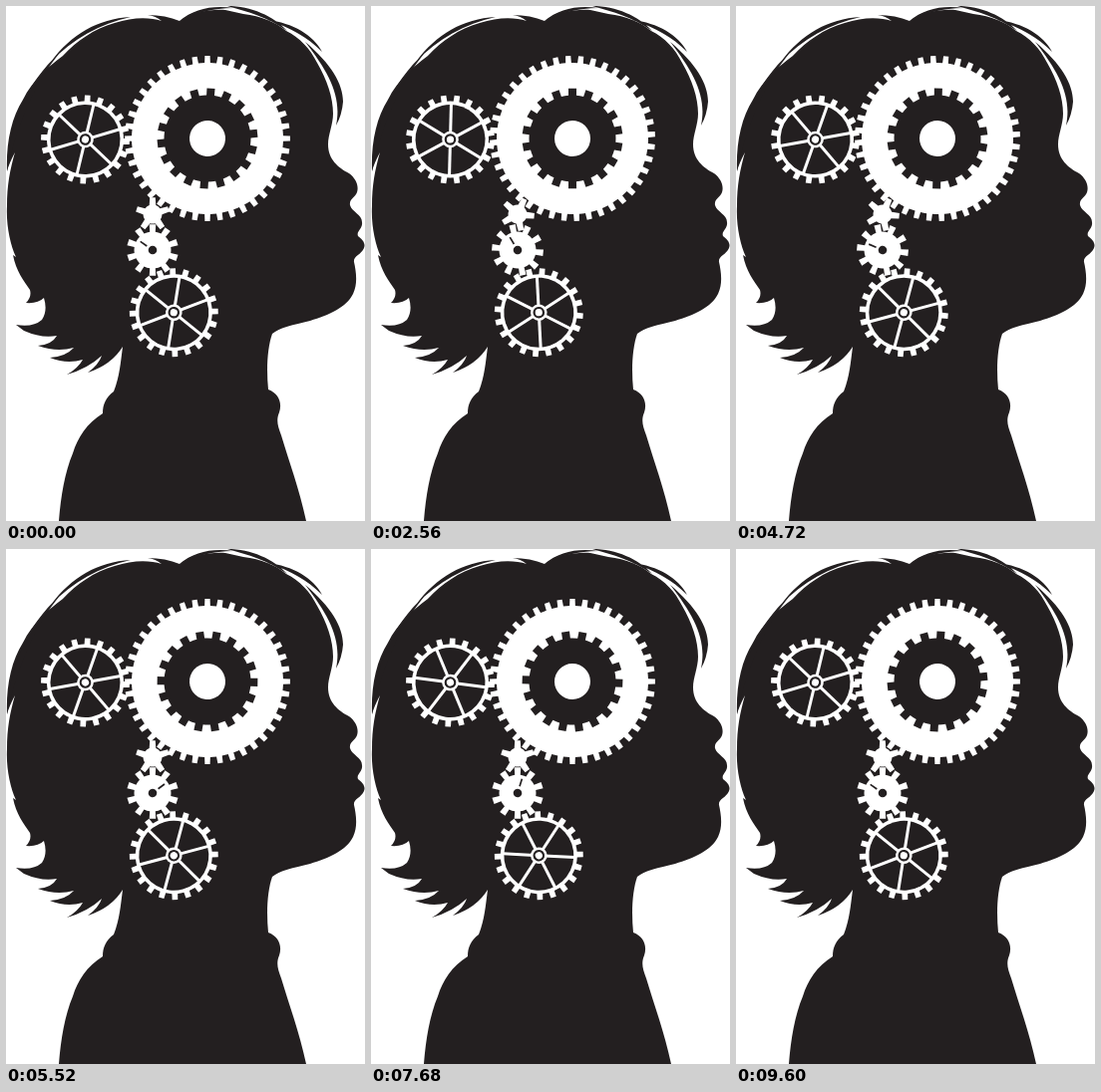
Write an HTML page with a canvas that moves like this. It is 360x517 px and loops after 9.68 s.

```html
<!DOCTYPE html>
<html lang="en">
<head>
<meta charset="utf-8">
<title>Turning gears</title>
<style>
html, body { margin: 0; width: 100%; height: 100%; overflow: hidden; background: #fff; }
canvas { display: block; width: 360px; height: 517px; }
</style>
</head>
<body>
<canvas id="stage" width="360" height="517"></canvas>
<script>
const ctx = document.getElementById('stage').getContext('2d');
const INK = '#231f20', PAPER = '#fff';
const STEP = 80, STEPS = 121;
const rad = deg => deg * Math.PI / 180;

const head = new Path2D(`M53 517 C55 492 59 468 67 449 C72 433 81 419 97 409
  C97 400 100 393 108 387 C114 372 115 357 117 342 Q106 360 82 368 Q93 360 96 351
  Q82 364 61 370 Q72 364 77 355 Q61 360 44 353 Q60 352 68 343 Q51 348 32 341
  Q46 340 51 331 Q36 334 18 326 L10 320 Q27 323 36 315 Q42 306 38 293
  Q32 299 20 298 Q26 292 24 285 C18 276 10 266 7 250 L10 252
  C4 239 0 219 1 201 C1 180 4 164 9 147 Q3 158 1 166 C0 138 5 113 17 94
  C27 74 41 62 57 50 C71 35 88 23 109 17 C127 11 144 11 156 15
  Q150 10 142 9 Q160 9 174 15 C186 6 205 3 220 4 L238 8
  C256 10 270 16 281 25 C295 32 305 43 312 57 C322 74 328 92 328 108
  C328 119 323 129 323 139 C323 154 333 162 344 168 C351 173 354 181 352 187
  C350 193 344 193 345 200 C347 207 357 209 357 217 C358 224 351 226 353 231
  C357 234 361 238 359 243 C356 250 348 251 349 257 C351 266 353 279 348 289
  C341 303 324 310 305 316 C288 320 274 323 267 329 C262 343 261 365 263 385
  C274 389 277 399 274 408 C271 415 272 421 276 431 C284 458 294 484 301 517 Z`);

// Loose strands of hair outside the main mass
const strands = new Path2D(`M1 166 C3 120 20 77 54 47 C30 76 12 115 1 166 Z
  M45 56 C66 28 92 13 125 11 C94 18 67 33 45 56 Z
  M174 15 C188 3 207 -1 228 2 C208 2 190 7 174 15 Z
  M222 0 C246 0 268 10 282 25 C262 11 243 6 222 0 Z
  M262 14 C288 17 308 29 317 46 C302 31 286 22 262 14 Z
  M300 36 C326 58 338 78 338 96 Q337 109 331 120 C337 91 324 67 300 36 Z`);

function disc(r, color) {
  ctx.fillStyle = color;
  ctx.beginPath();
  ctx.arc(0, 0, r, 0, 2 * Math.PI);
  ctx.fill();
}

function cog(teeth, base, tip, color, wide = 0.24, narrow = 0.2) {
  const pitch = 2 * Math.PI / teeth;
  ctx.fillStyle = color;
  ctx.beginPath();
  for (let i = 0; i < teeth; i++) {
    const mid = i * pitch - Math.PI / 2;
    for (const [r, offset] of [[base, -wide], [tip, -narrow], [tip, narrow], [base, wide]]) {
      const a = mid + offset * pitch;
      ctx.lineTo(r * Math.cos(a), r * Math.sin(a));
    }
    ctx.arc(0, 0, base, mid + wide * pitch, mid + (1 - wide) * pitch);
  }
  ctx.fill();
}

function spoke(from, to, width, color) {
  ctx.fillStyle = color;
  ctx.fillRect(-width / 2, -to, width, to - from);
}

function spokedWheel() {
  cog(20, 38.5, 44.5, PAPER);
  disc(35, INK);
  ctx.rotate(rad(-7.5));
  for (let i = 0; i < 6; i++) {
    spoke(5, 36, 3, PAPER);
    ctx.rotate(Math.PI / 3);
  }
  disc(8.3, PAPER);
  disc(5.8, INK);
  disc(3.6, PAPER);
}

function bigGear() {
  cog(40, 76, 83, PAPER);
  ctx.rotate(rad(4));
  cog(18, 43.5, 50.5, INK, 0.26, 0.23);
  disc(18, PAPER);
}

function smallGear() {
  cog(10, 18.5, 26, PAPER);
  disc(4.3, INK);
  ctx.rotate(rad(305));
  spoke(7, 15, 1.7, INK);
}

function starGear() {
  cog(5, 9.5, 17, PAPER, 0.28, 0.13);
}

// x, y, starting angle and turn per step in degrees
const gears = [
  [79.5, 134, 21, -6, spokedWheel],
  [202, 133, 0, 3, bigGear],
  [147, 209, 0, -24, starGear],
  [147, 245, 0, 12, smallGear],
  [168.3, 307.7, 16.5, -6, spokedWheel]
];

function draw(now) {
  const step = Math.floor((now + 0.01) / STEP) % STEPS;
  ctx.fillStyle = PAPER;
  ctx.fillRect(0, 0, 360, 517);
  ctx.fillStyle = INK;
  ctx.fill(head);
  ctx.fill(strands);
  for (const [x, y, start, turn, paint] of gears) {
    ctx.save();
    ctx.translate(x, y);
    ctx.rotate(rad(start + turn * step));
    paint();
    ctx.restore();
  }
  requestAnimationFrame(draw);
}
draw(0);
</script>
</body>
</html>
```
